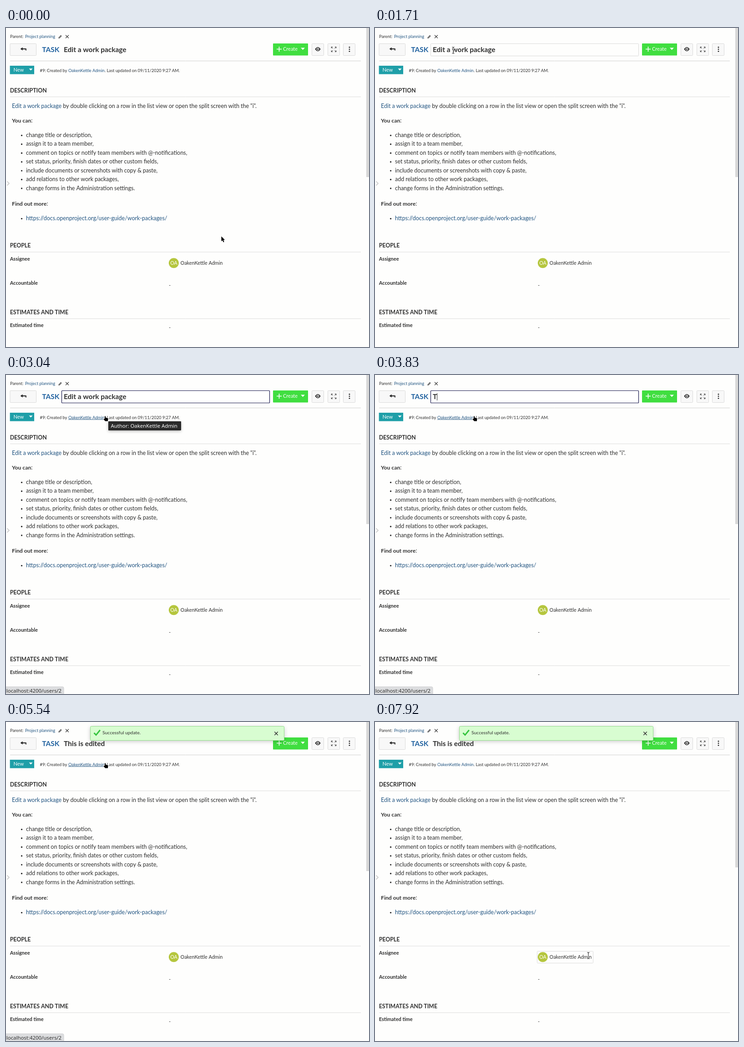
Recreate the animation shown at these times as an HTML page with a canvas. Size 798 px wide and 702 px high, loop 8000 ms.

```html
<!DOCTYPE html>
<html lang="en">
<head>
<meta charset="utf-8">
<title>Edit a work package</title>
<style>
  html, body { margin: 0; width: 100%; height: 100%; overflow: hidden; background: #fefefd; }
  canvas { display: block; }
</style>
</head>
<body>
<canvas id="stage" width="798" height="702"></canvas>
<script>
const ctx = document.getElementById('stage').getContext('2d');
const LOOP = 8000;
const USER = 'OakenKettle Admin';
const INK = '#2f2f2f', LINK = '#215481', BORDER = '#dadada', PAPER = '#fefefd';
const LATO = 'Lato, Carlito, sans-serif';
const SYSTEM = '"Noto Sans", "Open Sans", sans-serif';

const NEW_TITLE = 'This is edited';
const KEY_TIMES = [3830, 4000, 4065, 4130, 4290, 4360, 4430, 4500, 4580, 4790, 4840, 4900, 4960, 5130];

// ---- drawing helpers ----
function text(str, x, y, size, { color = INK, bold = false, family = LATO } = {}) {
  ctx.font = `${bold ? 'bold ' : ''}${size}px ${family}`;
  ctx.wordSpacing = '0px';
  if (family === LATO) ctx.wordSpacing = `${0.241 * size - ctx.measureText(' ').width}px`;
  ctx.fillStyle = color;
  ctx.fillText(str, x, y);
  return ctx.measureText(str).width;
}

function rect(x, y, w, h, fill) {
  ctx.fillStyle = fill;
  ctx.fillRect(x, y, w, h);
}

function roundBox(x, y, w, h, r, fill, stroke, width = 1) {
  ctx.beginPath();
  ctx.roundRect(x, y, w, h, r);
  if (fill) { ctx.fillStyle = fill; ctx.fill(); }
  if (stroke) { ctx.strokeStyle = stroke; ctx.lineWidth = width; ctx.stroke(); }
}

function line(points, color, width = 1) {
  ctx.beginPath();
  points.forEach(([x, y]) => ctx.lineTo(x, y));
  ctx.strokeStyle = color;
  ctx.lineWidth = width;
  ctx.stroke();
}

function polygon(points, fill) {
  ctx.beginPath();
  points.forEach(([x, y]) => ctx.lineTo(x, y));
  ctx.closePath();
  ctx.fillStyle = fill;
  ctx.fill();
}

function disc(x, y, r, fill) {
  ctx.beginPath();
  ctx.arc(x, y, r, 0, Math.PI * 2);
  ctx.fillStyle = fill;
  ctx.fill();
}

function cross(x, y, r, width) {
  line([[x - r, y - r], [x + r, y + r]], INK, width);
  line([[x - r, y + r], [x + r, y - r]], INK, width);
}

function shadowed(blur, dy, alpha, draw) {
  ctx.save();
  ctx.shadowColor = `rgba(0,0,0,${alpha})`;
  ctx.shadowBlur = blur;
  ctx.shadowOffsetY = dy;
  draw();
  ctx.restore();
}

// ---- motion ----
// Pointer moves arrive in equal steps; the first one lands at `start`, the last at `end`.
function stepped(t, start, end, count) {
  if (t < start) return 0;
  const gap = (end - start) / (count - 1);
  return Math.min(1, (Math.floor((t - start) / gap + 1e-6) + 1) / count);
}

const smooth = p => p * p * (3 - 2 * p);
const easeOut = p => 1 - (1 - p) ** 2;
const mix = (a, b, p) => [a[0] + (b[0] - a[0]) * p, a[1] + (b[1] - a[1]) * p];

const REST = [473, 458], BELOW_TITLE = [206, 91], TITLE = [172, 49], AUTHOR = [218, 90];
const LEAVE = [214, 88], RISE = [227, 65], ABOVE_PEOPLE = [416, 408], ASSIGNEE = [469, 514];

function pointer(t) {
  if (t < 1290) return mix(REST, BELOW_TITLE, smooth(stepped(t, 420, 1210, 10)));
  if (t < 2080) return mix(BELOW_TITLE, TITLE, easeOut(stepped(t, 1290, 1710, 6)));
  if (t < 6880) return mix(TITLE, AUTHOR, smooth(stepped(t, 2080, 2750, 9)));
  if (t < 7710) {
    const k = stepped(t, 6880, 7630, 12) * 12;
    return k <= 3 ? mix(LEAVE, RISE, (k - 1) / 2) : mix(RISE, ABOVE_PEOPLE, smooth((k - 3) / 9));
  }
  return mix(ABOVE_PEOPLE, ASSIGNEE, easeOut(stepped(t, 7710, 7920, 4)));
}

// ---- pointer shapes ----
function outlined(points) {
  ctx.beginPath();
  points.forEach(([x, y]) => ctx.lineTo(x, y));
  ctx.closePath();
  ctx.lineJoin = 'round';
  ctx.strokeStyle = '#fff';
  ctx.lineWidth = 1.8;
  ctx.stroke();
  ctx.fillStyle = '#000';
  ctx.fill();
  ctx.lineJoin = 'miter';
}

const shapes = {
  arrow() {
    outlined([[0.4, 0.4], [0.4, 11.6], [2.9, 9.3], [4.8, 13.6], [6.7, 12.8], [4.8, 8.6], [8.2, 8.6]]);
  },
  hand() {
    outlined([[-1, 0.4], [0.8, 0.4], [1.4, 4], [5.2, 4.6], [6.4, 6], [6, 11.4], [0, 11.4], [-3.4, 7.4], [-3, 5.8], [-0.8, 6.4]]);
  },
  beam() {
    for (const [color, width] of [['#fff', 2.6], ['#222', 1.1]]) {
      line([[0, -6.5], [0, 6.5]], color, width);
      line([[-2.6, -7], [-0.8, -6.8], [0, -6], [0.8, -6.8], [2.6, -7]], color, width);
      line([[-2.6, 7], [-0.8, 6.8], [0, 6], [0.8, 6.8], [2.6, 7]], color, width);
    }
  }
};

function drawPointer(kind, [x, y]) {
  ctx.save();
  ctx.translate(x, y);
  shapes[kind]();
  ctx.restore();
}

// ---- page parts ----
function toolbar() {
  text('Parent:', 9, 22, 9.35);
  text('Project planning', 42, 22, 9.35, { color: LINK });
  polygon([[115.2, 23], [115.8, 20.4], [120.5, 15.6], [122.7, 17.8], [118, 22.5]], '#555');
  line([[117, 21.2], [121, 17.2]], '#ddd', 0.8);
  cross(134.5, 19, 3.4, 1.3);

  roundBox(9, 34.5, 57.5, 26, 1, '#f8f8f8', BORDER);
  line([[34, 46], [43.8, 46], [43.8, 49.6]], '#222', 1.8);
  polygon([[31.6, 46], [36.6, 42.6], [36.6, 49.4]], '#222');

  roundBox(587, 34, 77, 26.6, 1, '#40de40');
  line([[595, 46.5], [606, 46.5]], '#fff', 1.6);
  line([[600.5, 41], [600.5, 52]], '#fff', 1.6);
  text('Create', 609, 50.3, 11, { color: '#fff' });
  polygon([[648, 43.5], [657, 43.5], [652.5, 48.2]], '#fff');

  for (const x of [672.5, 707.5, 741.5]) roundBox(x, 34.5, 26, 26, 1, '#f8f8f8', BORDER);
  ctx.beginPath();
  ctx.moveTo(679.5, 46.5);
  ctx.quadraticCurveTo(685.5, 37.5, 691.5, 46.5);
  ctx.quadraticCurveTo(685.5, 55.5, 679.5, 46.5);
  ctx.fillStyle = '#222';
  ctx.fill();
  disc(685.5, 46.5, 2.9, '#fff');
  disc(685.5, 46.5, 1.6, '#222');

  for (const sx of [-1, 1]) for (const sy of [-1, 1]) {
    const at = (dx, dy) => [720.5 + sx * dx, 47 + sy * dy];
    line([at(2.4, 5.2), at(5.2, 5.2), at(5.2, 2.4)], INK, 1.1);
    line([at(1.8, 1.8), at(5, 5)], INK, 1);
  }
  for (const y of [42.3, 46.8, 51.3]) disc(755, y, 1.4, '#222');

  line([[9, 72.5], [780, 72.5]], '#d0d0d0');
}

function statusRow(hovered) {
  rect(8.6, 83, 53.4, 18.6, '#1f9fa8');
  text('New', 16.5, 95.5, 11, { color: '#fff' });
  polygon([[50.5, 89.3], [58.5, 89.3], [54.5, 93.4]], '#fff');
  text('#9: Created by', 74.5, 96.5, 9.3);
  const width = text(USER, 137, 96.5, 9.35, { color: LINK });
  if (hovered) line([[137, 98], [137 + width, 98]], LINK, 0.9);
  text('. Last updated on 09/11/2020 9:27 AM.', 217, 96.5, 9.4);
}

function section(title, y) {
  text(title, 8.7, y, 12.3, { bold: true });
  line([[9, y + 10], [780, y + 10]], '#dcdcdc');
}

function bullet(str, y, color) {
  disc(34.5, y - 3.6, 1.7, INK);
  text(str, 44, y, 12.48, { color });
}

function description(hovered) {
  section('DESCRIPTION', 141.5);
  if (hovered) roundBox(8.5, 158.5, 771, 284, 1, null, BORDER);
  const link = text('Edit a work package', 13, 176, 12.49, { color: LINK });
  text(' by double clicking on a row in the list view or open the split screen with the "i".', 13 + link, 176, 12.49);
  for (const [label, y] of [['You can', 207.8], ['Find out more', 391.3]]) {
    const width = text(label, 13, y, 12.2, { bold: true });
    text(':', 13 + width, y, 12.49);
  }
  [
    'change title or description,',
    'assign it to a team member,',
    'comment on topics or notify team members with @-notifications,',
    'set status, priority, finish dates or other custom fields,',
    'include documents or screenshots with copy & paste,',
    'add relations to other work packages,',
    'change forms in the Administration settings.'
  ].forEach((item, i) => bullet(item, 240 + i * 19.42, INK));
  bullet('https://docs.openproject.org/user-guide/work-packages/', 423.2, LINK);
}

function details(hovered) {
  section('PEOPLE', 483);
  text('Assignee', 8.7, 511.7, 11, { bold: true });
  if (hovered) roundBox(356.5, 504.5, 123, 26, 1, null, BORDER);
  disc(368.8, 517.2, 11, '#b5c63e');
  text('OA', 361.3, 521, 10.6, { color: '#fff' });
  text(USER, 383.6, 520.5, 10.9);
  text('Accountable', 8.7, 565.2, 11, { bold: true });
  text('-', 358, 570, 10.9);
  section('ESTIMATES AND TIME', 629.7);
  text('Estimated time', 8.7, 657.6, 11, { bold: true });
  text('-', 358, 662.5, 10.9);
}

function titleField(t, hovered) {
  const style = { bold: true }, x = 127, y = 52.6, size = 15.45;
  text('TASK', 79.3, y, size, { bold: true, color: '#2263a0' });

  const editing = t >= 2000 && t < 5250;
  const saving = t >= 5250 && t < 5540;
  if (editing) roundBox(122.5, 34.5, 457, 27, 1, '#fff', '#18184e', 1.2);
  else if (saving) roundBox(122.5, 34.5, 457, 27, 1, '#f8f8f8', BORDER);
  else if (hovered) roundBox(122.5, 34.5, 457, 27, 1, null, BORDER);

  if (t < KEY_TIMES[0]) {
    const selected = t >= 3330;
    if (selected) rect(126.5, 40, 139, 17, '#3584e4');
    text('Edit a work package', x, y, size, { bold: true, color: selected ? '#fff' : INK });
    if (t >= 2380 && t < 2880) rect(165, 40, 1, 16, INK);
  } else {
    const typed = KEY_TIMES.filter(k => k <= t).length;
    const width = text(NEW_TITLE.slice(0, typed), x, y, size, style);
    if (editing) rect(Math.round(x + width), 40, 1, 16, INK);
  }
}

function notification() {
  shadowed(10, 2, 0.22, () => roundBox(185.5, 9.5, 426, 31, 2, '#d8fdd1'));
  roundBox(185.5, 9.5, 426, 31, 2, '#d8fdd1', '#93dc8c');
  line([[193.5, 24], [198, 28.6], [206.8, 17.8]], '#35c53f', 3);
  text('Successful update.', 212, 27.3, 10.4);
  cross(594, 25.2, 3.7, 1.4);
}

function tooltip() {
  shadowed(6, 2, 0.3, () => rect(225, 102, 159.6, 19.6, '#2b2b2b'));
  roundBox(225.5, 102.5, 158.6, 18.6, 0, null, '#161616');
  text('Author: ' + USER, 230.5, 116, 11.35, { color: '#fff', family: SYSTEM });
}

function linkPreview() {
  roundBox(-2, 686, 129, 20, [0, 3, 0, 0], '#dcdddf', '#cfcfd1');
  text('localhost:4200/users/2', 0.8, 699, 11.4, { family: SYSTEM });
}

// ---- frame ----
function draw(t) {
  const at = pointer(t), y = at[1];
  const onAuthor = t >= 2750 && t < 6880;
  const onTitle = y < 62 && t < 2750;
  const onDescription = y > 158 && y < 400;
  const onAssignee = y > 504;

  rect(0, 0, 798, 702, PAPER);
  rect(792, 0, 6, t < 6040 ? 328 : 320, '#d8d8d8');
  line([[2.5, 337.5], [7, 342], [2.5, 346.5]], '#bbb', 1.2);

  toolbar();
  titleField(t, onTitle);
  statusRow(onAuthor);
  description(onDescription);
  details(onAssignee);

  if (t >= 5540) notification();
  if (t >= 2750 && t < 7080) linkPreview();
  if (t >= 3040 && t < 3170) tooltip();

  drawPointer(onAuthor ? 'hand' : onTitle || onDescription || onAssignee ? 'beam' : 'arrow', at);
}

function tick(now) {
  draw(now % LOOP);
  requestAnimationFrame(tick);
}
requestAnimationFrame(tick);
</script>
</body>
</html>
```
